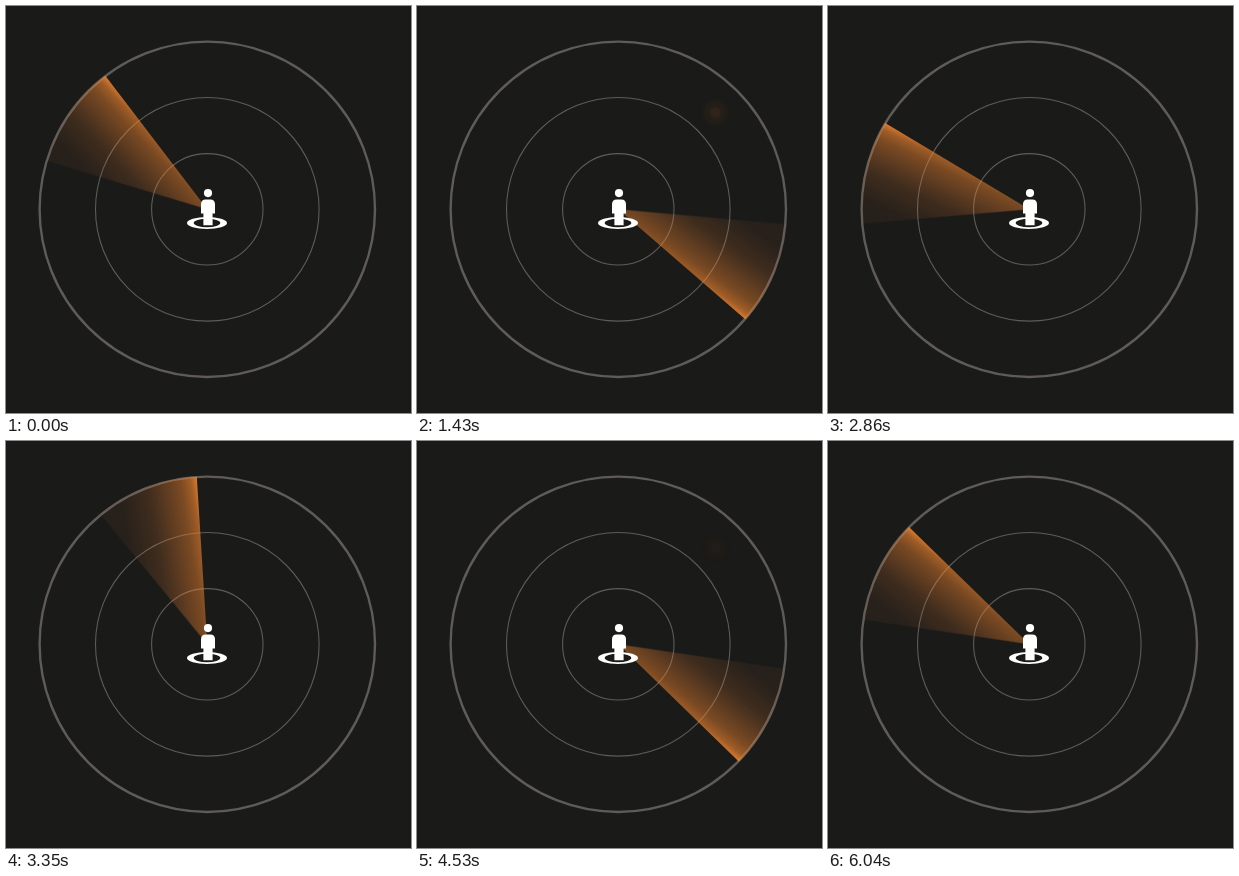
Recreate the animation shown at these times as an HTML page. Size 405 by 407 pixels, loop 6110 ms.

```html
<!DOCTYPE html>
<html lang="en">
<head>
<meta charset="utf-8">
<title>Radar sweep</title>
<style>
  html, body { margin: 0; width: 100%; height: 100%; overflow: hidden; background: #1a1a18; }
  svg { display: block; width: 405px; height: 407px; }
</style>
</head>
<body>
<svg viewBox="0 0 405 407" aria-label="Radar sweep around a person">
  <defs>
    <linearGradient id="beam" gradientUnits="userSpaceOnUse" x1="-83.5" y1="8.8" x2="17.5" y2="-1.8">
      <stop offset="0" stop-color="#d9773a" stop-opacity=".06"/>
      <stop offset=".22" stop-color="#d9773a" stop-opacity=".07"/>
      <stop offset=".5" stop-color="#e47d35" stop-opacity=".18"/>
      <stop offset=".83" stop-color="#f0842f" stop-opacity=".45"/>
      <stop offset=".93" stop-color="#f0842f" stop-opacity=".62"/>
      <stop offset="1" stop-color="#f0842f" stop-opacity=".9"/>
    </linearGradient>
    <radialGradient id="glow">
      <stop offset="0" stop-color="#f0842f" stop-opacity=".7"/>
      <stop offset=".4" stop-color="#f0842f" stop-opacity=".45"/>
      <stop offset="1" stop-color="#f0842f" stop-opacity="0"/>
    </radialGradient>
  </defs>
  <g fill="none" stroke="#5e5b58">
    <circle cx="201.3" cy="203.3" r="167.7" stroke-width="2.4"/>
    <circle cx="201.3" cy="203.3" r="111.8" stroke-width="1.1"/>
    <circle cx="201.3" cy="203.3" r="55.7" stroke-width="1.1"/>
  </g>
  <path id="wedge" fill="url(#beam)"/>
  <g id="blip">
    <circle cx="298.5" cy="106.5" r="17" fill="url(#glow)"/>
    <circle cx="298.5" cy="106.5" r="5" fill="#ee8030" fill-opacity=".8"/>
  </g>
  <g fill="#fff">
    <path fill-rule="evenodd" d="M181 217a20 6 0 0 1 40 0a20 6 0 0 1-40 0zM187.7 217a13.3 4.2 0 0 0 26.6 0a13.3 4.2 0 0 0-26.6 0z"/>
    <circle cx="202" cy="187.1" r="4.1"/>
    <path d="M195 198.2q0-4.7 4.7-4.7h4.6q4.7 0 4.7 4.7v9.3h-2.4v11.8h-9.2v-11.8h-2.4z"/>
  </g>
</svg>
<script>
const LOOP = 6110, TURN = LOOP / 2, R = 168;
const TAIL = 35.8 * Math.PI / 180;
const wedge = document.getElementById('wedge');
const blip = document.getElementById('blip');

wedge.setAttribute('d',
  `M0 0L${-R * Math.sin(TAIL)} ${-R * Math.cos(TAIL)}A${R} ${R} 0 0 1 0 ${-R}Z`);

// Two clockwise turns per loop at a slightly uneven pace.
const sweep = wedge.animate(
  [[0, 322.5], [1430, 490.8], [2860, 660.8], [3840, 771.8], [5150, 928], [LOOP, 1042.5]]
    .map(([time, deg]) => ({
      offset: time / LOOP,
      transform: `translate(201.3px, 203.3px) rotate(${deg}deg)`
    })),
  { duration: LOOP, iterations: Infinity });
sweep.pause();

// The blip lights up just ahead of the beam, then fades slowly.
function blipOpacity(time) {
  const rise = (time - 460) / 190;
  const fall = (1500 - time) / 600;
  return Math.max(0, Math.min(1, rise, fall));
}

const start = performance.now();
function draw() {
  const time = (performance.now() - start) % LOOP;
  sweep.currentTime = time;
  blip.setAttribute('opacity', blipOpacity(time % TURN));
  requestAnimationFrame(draw);
}
draw();
</script>
</body>
</html>
```
